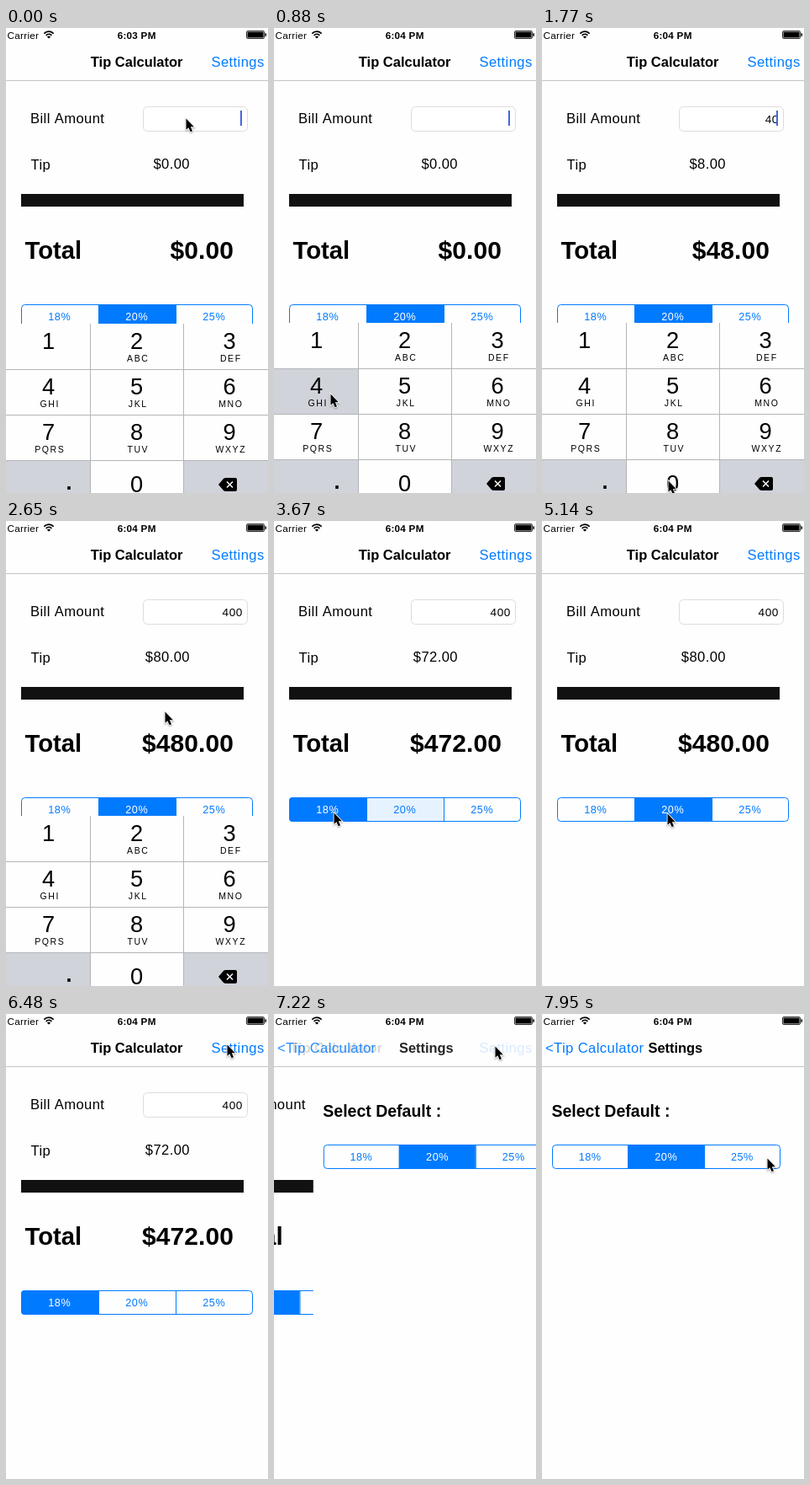
Write an HTML page with a canvas that moves like this. It is 312 px wide and 552 px high and loops after 8 s.

```html
<!DOCTYPE html>
<html lang="en">
<head>
<meta charset="utf-8">
<title>Tip Calculator</title>
<style>
  html, body { margin: 0; width: 100%; height: 100%; overflow: hidden; background: #fefefe; }
  canvas { display: block; width: 312px; height: 552px; }
</style>
</head>
<body>
<canvas id="stage"></canvas>
<script>
const W = 312, H = 552, LOOP = 8000, STEP = 147.2;
const BLUE = '#007aff', PAPER = '#fefefe', KEY_GRAY = '#d0d3d9', LINE = '#b3b5b8';
const RATES = [18, 20, 25];
const KEYS = ['', 'ABC', 'DEF', 'GHI', 'JKL', 'MNO', 'PQRS', 'TUV', 'WXYZ'];
const COLS = [50.5, 155.5, 266];

// Timelines: [step, value...]
const POINTER = [
  [0, 214, 107], [1, 206, 124], [5, 67, 434], [7, 67, 434], [8, 89, 458],
  [10, 150, 537], [14, 150, 537], [17, 189, 226], [19, 189, 226], [24, 71, 346],
  [25, 71, 346], [28, 150, 350], [31, 240, 351], [32, 240, 351], [34, 149, 347],
  [35, 149, 347], [37, 70, 347], [38, 74, 338], [40, 204, 78], [42, 244, 47],
  [44, 263, 36], [46, 263, 38], [49, 263, 38], [53, 268, 170], [54, 268, 171]
];
const AMOUNT = [[0, ''], [7, '4'], [12, '40'], [14, '400']];
const CHOICE = [[0, 1], [25, 0], [28, 1], [31, 2], [34, 1], [37, 0]];
const PRESSED = [[0, 0], [6, '4'], [7, 0], [11, '0'], [12, 0], [13, '0'], [14, 0]];
const CARET = [[0, 1], [9, 0], [11, 1], [17, 0]];
const KEYBOARD_Y = [[0, 351], [1, 350], [19, 442], [20, 530], [21, H]];
const PUSH = [[0, 0], [48, 0.35], [49, 0.85], [50, 0.98], [51, 1]];

const canvas = document.getElementById('stage');
const ctx = canvas.getContext('2d');
const dpr = window.devicePixelRatio || 1;
canvas.width = W * dpr;
canvas.height = H * dpr;

const indexAt = (track, k) => {
  let i = 0;
  while (i + 1 < track.length && track[i + 1][0] <= k) i++;
  return i;
};
const valueAt = (track, k) => track[indexAt(track, k)][1];
const mix = (a, b, u) => a + (b - a) * u;

function pointerAt(k) {
  const i = indexAt(POINTER, k);
  const a = POINTER[i], b = POINTER[i + 1] || a;
  const u = a === b ? 0 : (k - a[0]) / (b[0] - a[0]);
  const s = u * u * (3 - 2 * u);
  return [mix(a[1], b[1], s), mix(a[2], b[2], s)];
}

function text(str, x, y, size, { bold, color = '#000', align = 'left', gap = 0 } = {}) {
  ctx.font = `${bold ? 'bold ' : ''}${size}px "Liberation Sans", Arial, sans-serif`;
  ctx.letterSpacing = gap + 'px';
  ctx.textAlign = align;
  ctx.fillStyle = color;
  ctx.fillText(str, x + (align === 'right' ? gap : align === 'center' ? gap / 2 : 0), y);
}

function rect(x, y, w, h, color) {
  ctx.fillStyle = color;
  ctx.fillRect(x, y, w, h);
}

function roundPath(x, y, w, h, r) {
  ctx.beginPath();
  ctx.roundRect(x, y, w, h, r);
}

function faded(alpha, draw) {
  ctx.save();
  ctx.globalAlpha *= alpha;
  draw();
  ctx.restore();
}

function segments(x, y, w, selected, fading = -1) {
  const h = 29, cell = w / 3;
  ctx.save();
  roundPath(x, y, w, h, 4);
  ctx.clip();
  RATES.forEach((rate, i) => {
    const left = Math.round(x + i * cell - 0.4), right = Math.round(x + (i + 1) * cell);
    if (i === selected) rect(left, y, right - left, h, BLUE);
    else if (i === fading) rect(left, y, right - left, h, '#e7f2ff');
    if (i) rect(left, y, 1, h, BLUE);
    text(rate + '%', x + (i + 0.5) * cell - 0.5, y + 19, 12.7,
      { align: 'center', gap: 0.5, color: i === selected ? '#fff' : BLUE });
  });
  ctx.restore();
  roundPath(x + 0.5, y + 0.5, w - 1, h - 1, 4);
  ctx.strokeStyle = BLUE;
  ctx.lineWidth = 1;
  ctx.stroke();
}

function calculator(k) {
  const amount = valueAt(AMOUNT, k);
  const i = indexAt(CHOICE, k), choice = CHOICE[i][1];
  const fading = i && CHOICE[i][0] === k ? CHOICE[i - 1][1] : -1;
  const tip = amount * RATES[choice] / 100;
  const money = v => '$' + v.toFixed(2);

  text('Bill Amount', 29, 113, 16.6, { gap: 0.4 });
  roundPath(163.5, 93.5, 124, 29, 5);
  ctx.fillStyle = '#fff';
  ctx.fill();
  ctx.strokeStyle = '#dcdcdc';
  ctx.lineWidth = 1;
  ctx.stroke();
  text(amount, 281.3, 112.5, 13.65, { align: 'right', gap: 0.5 });
  if (valueAt(CARET, k)) rect(279, 98, 2, 18, '#4266e0');

  text('Tip', 29.5, 168, 16.6, { gap: 0.4 });
  text(money(tip), 218.6, 167, 16.6, { align: 'right', gap: 0.4 });
  rect(18, 197, 265, 15, '#111');
  text('Total', 22.5, 273.5, 29.25, { bold: true });
  text(money(+amount + tip), 271, 273.5, 30, { bold: true, align: 'right', gap: 0.1 });
  segments(18, 328, 276, choice, fading);
}

function settings() {
  rect(0, 63, W, H - 63, PAPER);
  text('Select Default :', 11.5, 122, 19.5, { bold: true });
  segments(12, 155, 272, 1);
}

function backspace(x, y) {
  ctx.beginPath();
  ctx.moveTo(x, y + 8);
  ctx.lineTo(x + 6, y + 1);
  ctx.quadraticCurveTo(x + 7, y, x + 9, y);
  ctx.lineTo(x + 20, y);
  ctx.quadraticCurveTo(x + 22, y, x + 22, y + 2);
  ctx.lineTo(x + 22, y + 14);
  ctx.quadraticCurveTo(x + 22, y + 16, x + 20, y + 16);
  ctx.lineTo(x + 9, y + 16);
  ctx.quadraticCurveTo(x + 7, y + 16, x + 6, y + 15);
  ctx.closePath();
  ctx.fillStyle = '#000';
  ctx.fill();
  ctx.beginPath();
  ctx.moveTo(x + 10, y + 4.5);
  ctx.lineTo(x + 17, y + 11.5);
  ctx.moveTo(x + 17, y + 4.5);
  ctx.lineTo(x + 10, y + 11.5);
  ctx.strokeStyle = '#fff';
  ctx.lineWidth = 1.5;
  ctx.stroke();
}

function keyboard(top, pressed) {
  if (top >= H) return;
  ctx.save();
  ctx.translate(0, top);
  rect(0, 0, W, 204, PAPER);
  rect(0, 162, 100, 42, KEY_GRAY);
  rect(212, 162, 100, 42, KEY_GRAY);
  if (pressed === '4') rect(0, 54, 100, 54, KEY_GRAY);
  if (pressed === '0') rect(101, 162, 110, 42, KEY_GRAY);
  for (const y of [54, 108, 162]) rect(0, y, W, 1, LINE);
  for (const x of [100, 211]) rect(x, 0, 1, 204, LINE);
  KEYS.forEach((letters, i) => {
    const x = COLS[i % 3], y = Math.floor(i / 3) * 54;
    text(String(i + 1), x, y + 30, 27.3, { align: 'center' });
    text(letters, x + 1, y + 45, 10.5, { align: 'center', gap: 1.6 });
  });
  text('0', COLS[1], 199.5, 27.3, { align: 'center' });
  text('.', 75, 196.5, 25, { bold: true, align: 'center' });
  backspace(253, 183);
  ctx.restore();
}

function statusBar(k) {
  text('Carrier', 1.5, 12.5, 11.7, { gap: 0.3 });
  ctx.strokeStyle = '#000';
  ctx.lineWidth = 1.7;
  for (const r of [4.6, 7.8]) {
    ctx.beginPath();
    ctx.arc(51, 12, r, -Math.PI * 0.76, -Math.PI * 0.24);
    ctx.stroke();
  }
  ctx.beginPath();
  ctx.moveTo(51, 12.5);
  ctx.arc(51, 12.5, 2.9, -Math.PI * 0.76, -Math.PI * 0.24);
  ctx.fillStyle = '#000';
  ctx.fill();

  text(k < 3 ? '6:03 PM' : '6:04 PM', 132.7, 12.5, 11.7, { bold: true, gap: 0.25 });

  roundPath(286.5, 3.5, 21, 9, 1.5);
  ctx.lineWidth = 0.8;
  ctx.stroke();
  rect(287.5, 4.5, 19, 7, '#000');
  rect(308.5, 6.3, 1.5, 3.4, '#000');
}

function navBar(push) {
  rect(0, 0, W, 62, PAPER);
  rect(0, 62, W, 1, '#c4c4c4');
  const title = { bold: true };
  const link = { color: BLUE, gap: 0.4 };
  if (push < 1) {
    faded(1 - push, () => {
      text('Tip Calculator', 100.8 - 96 * push, 46, 16.5, title);
      text('Settings', 244.5, 46, 16.6, link);
    });
  }
  if (push > 0) {
    faded(push, () => {
      text('<Tip Calculator', 4, 46, 16.6, link);
      text('Settings', 126.5 + 150 * (1 - push), 46, 16.4, title);
    });
  }
}

function pointer(x, y) {
  ctx.save();
  ctx.translate(x, y);
  ctx.beginPath();
  ctx.moveTo(0.5, 0.5);
  for (const [px, py] of [[0.5, 13.8], [3.4, 11.2], [5.6, 16.2], [8, 15.2], [5.8, 10.3], [9.9, 10.3]]) {
    ctx.lineTo(px, py);
  }
  ctx.closePath();
  ctx.shadowColor = 'rgba(0,0,0,.35)';
  ctx.shadowBlur = 2 * dpr;
  ctx.shadowOffsetY = dpr;
  ctx.strokeStyle = '#fff';
  ctx.lineWidth = 1.8;
  ctx.stroke();
  ctx.shadowColor = 'transparent';
  ctx.fillStyle = '#000';
  ctx.fill();
  ctx.restore();
}

function shifted(dx, draw) {
  ctx.save();
  ctx.translate(dx, 0);
  draw();
  ctx.restore();
}

function draw(time) {
  const k = Math.floor((time + 12) / STEP);
  const push = valueAt(PUSH, k);
  ctx.setTransform(dpr, 0, 0, dpr, 0, 0);
  rect(0, 0, W, H, PAPER);
  if (push < 1) shifted(-0.3 * W * push, () => calculator(k));
  if (push > 0) shifted(W * (1 - push), settings);
  keyboard(valueAt(KEYBOARD_Y, k), valueAt(PRESSED, k));
  navBar(push);
  statusBar(k);
  pointer(...pointerAt(k));
}

const start = performance.now();
function tick() {
  draw((performance.now() - start) % LOOP);
  requestAnimationFrame(tick);
}
tick();
</script>
</body>
</html>
```
